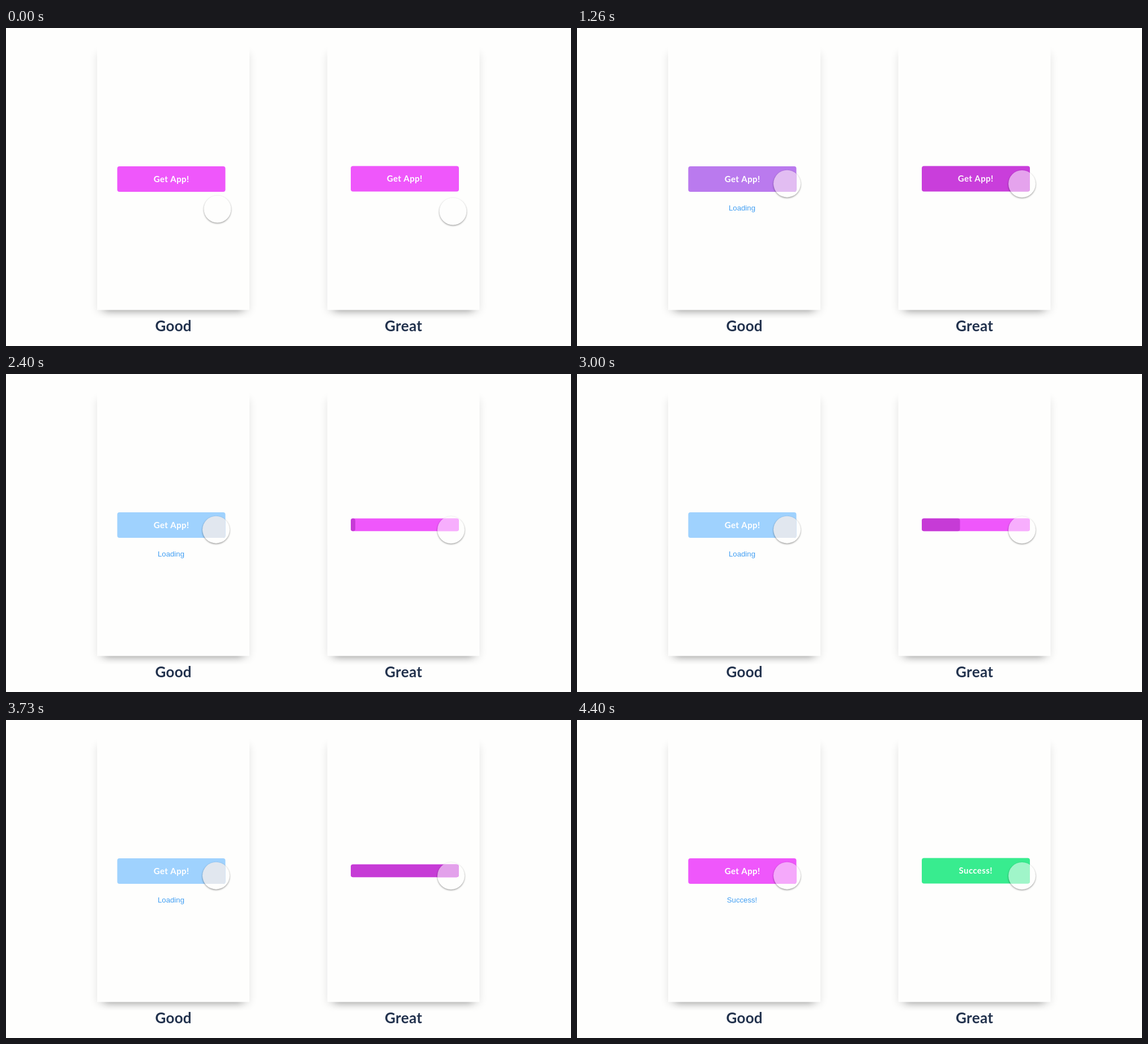
An HTML page with a canvas that plays this animation: 998x561 px, repeating every 5.13 s.

```html
<!DOCTYPE html>
<html lang="en">
<head>
<meta charset="utf-8">
<title>Good and great button feedback</title>
<style>
html, body { margin: 0; width: 100%; height: 100%; overflow: hidden; background: #fefefd; }
canvas { display: block; }
</style>
</head>
<body>
<canvas id="stage" width="998" height="561"></canvas>
<script>
const ctx = document.getElementById('stage').getContext('2d');
const LOOP = 5130, BG = '#fefefd', FAR = 3000;
const PINK = [239, 87, 251], DARK = [198, 59, 214], BLUE = [159, 210, 254], GREEN = [56, 236, 143];

const mix = (a, b, k) => Array.isArray(a) ? a.map((v, i) => mix(v, b[i], k)) : a + (b - a) * k;
const smooth = k => k * k * (3 - 2 * k);
const cubic = k => k < .5 ? 4 * k ** 3 : 1 - 4 * (1 - k) ** 3;
const linear = k => k;
const rgb = c => `rgb(${c.map(Math.round)})`;

// Value at time t along [time, value] stops
function track(t, stops, ease = linear) {
  if (t <= stops[0][0]) return stops[0][1];
  for (let i = 1; i < stops.length; i++) {
    const [t0, a] = stops[i - 1], [t1, b] = stops[i];
    if (t < t1) return mix(a, b, ease((t - t0) / (t1 - t0)));
  }
  return stops[stops.length - 1][1];
}

function text(str, x, y, font, color, alpha = 1, spacing = 0) {
  ctx.globalAlpha = alpha;
  ctx.font = font;
  ctx.letterSpacing = spacing + 'px';
  ctx.textAlign = 'center';
  ctx.fillStyle = color;
  ctx.fillText(str, x + spacing / 2, y);
  ctx.globalAlpha = 1;
}
const label = (str, x, y, alpha) => text(str, x, y, '700 15px Lato, sans-serif', '#fff', alpha, .4);
const note = (str, alpha) =>
  text(str, 291.5, 321.5, '13.2px "Liberation Sans", Arial, sans-serif', '#429ff3', alpha);

function box(x, y, w, h, r, color) {
  ctx.beginPath();
  ctx.roundRect(x, y, w, h, r);
  ctx.fillStyle = color;
  ctx.fill();
}

// Draws only the shadow of a shape
function shadow(draw, blur, alpha, dy = 0) {
  ctx.save();
  ctx.shadowColor = `rgba(0,0,0,${alpha})`;
  ctx.shadowBlur = blur;
  ctx.shadowOffsetX = FAR;
  ctx.shadowOffsetY = dy;
  draw();
  ctx.restore();
}

function card(x, title, cut) {
  shadow(() => box(x - FAR, 44, 269, 457, 4, '#000'), 15, .11);
  shadow(() => box(x + 13 - FAR, 300, 243, 199, 4, '#000'), 14, .32);
  ctx.fillStyle = BG;
  ctx.fillRect(x, 15, 269, 482.5);
  ctx.fillRect(x - 25, cut, 320, 49);
  text(title, x + 134.5, 535, '700 26px Lato, sans-serif', '#22324d', 1, .3);
}

const RADIUS = 24;
function disc(x, y) {
  ctx.beginPath();
  ctx.arc(x, y, RADIUS, 0, 7);
}

// Pointer: translucent over the button, shadow only outside itself
function pointer(x, y, button, tint) {
  ctx.save();
  ctx.beginPath();
  ctx.roundRect(...button, 4);
  ctx.clip();
  disc(x, y);
  ctx.fillStyle = tint;
  ctx.fill();
  ctx.restore();

  ctx.save();
  ctx.beginPath();
  ctx.rect(0, 0, 998, 561);
  ctx.moveTo(x + RADIUS, y);
  ctx.arc(x, y, RADIUS, 0, 7);
  ctx.clip('evenodd');
  shadow(() => { disc(x - FAR, y); ctx.fillStyle = '#000'; ctx.fill(); }, 3, .4, 1.3);
  ctx.restore();
}

function good(t, move) {
  const button = [196.5, 244, 191, 45];
  const times = [600, 730, 1110, 1260, 1460, 3930, 4400];
  const along = colors => rgb(track(t, colors.map((c, i) => [times[i], c])));
  const fill = along([PINK, DARK, DARK, [186, 122, 238], BLUE, BLUE, PINK]);
  const soft = [245, 169, 251], deep = [227, 165, 235], pale = [225, 231, 239];
  const tint = along([soft, deep, deep, [226, 189, 242], pale, pale, soft]);
  card(161, 'Good', 512);
  box(...button, 4, fill);
  label('Get App!', 292, 271.5);
  note('Loading', track(t, [[940, 0], [1150, 1], [3930, 1], [4160, 0]]));
  note('Success!', track(t, [[4130, 0], [4400, 1]]));
  pointer(mix(373.5, 371, move), mix(319.5, 274.7, move), button, tint);
}

function great(t, move) {
  const slim = track(t, [[1260, 0], [1600, 1], [3930, 1], [4400, 0]], smooth);
  const h = mix(45, 22.5, slim), y = 266 - h / 2;
  const button = [609, y, 191, h];
  const base = track(t, [[600, PINK], [730, DARK], [1200, DARK], [1260, [201, 62, 219]], [1600, PINK]]);
  const done = track(t, [[3930, DARK], [4400, GREEN]]);
  card(567.5, 'Great', 515.5);
  if (t < 3840) box(...button, 4, rgb(base));
  if (t >= 2400) {
    const w = track(t, [[2360, 8], [3840, 191]], cubic);
    box(609, y, w, h, 4, rgb(done));
  }
  label('Get App!', 704, 271, track(t, [[1250, 1], [1500, 0]]));
  label('Success!', 704, 271, track(t, [[4130, 0], [4400, 1]]));
  pointer(mix(789.5, 786, move), mix(323.5, 275, move), button, 'rgba(255,255,255,.52)');
}

function frame(now) {
  const t = now % LOOP;
  const move = track(t, [[80, 0], [600, 1]], smooth);
  ctx.fillStyle = BG;
  ctx.fillRect(0, 0, 998, 561);
  good(t, move);
  great(t, move);
  requestAnimationFrame(frame);
}
requestAnimationFrame(frame);
</script>
</body>
</html>
```
